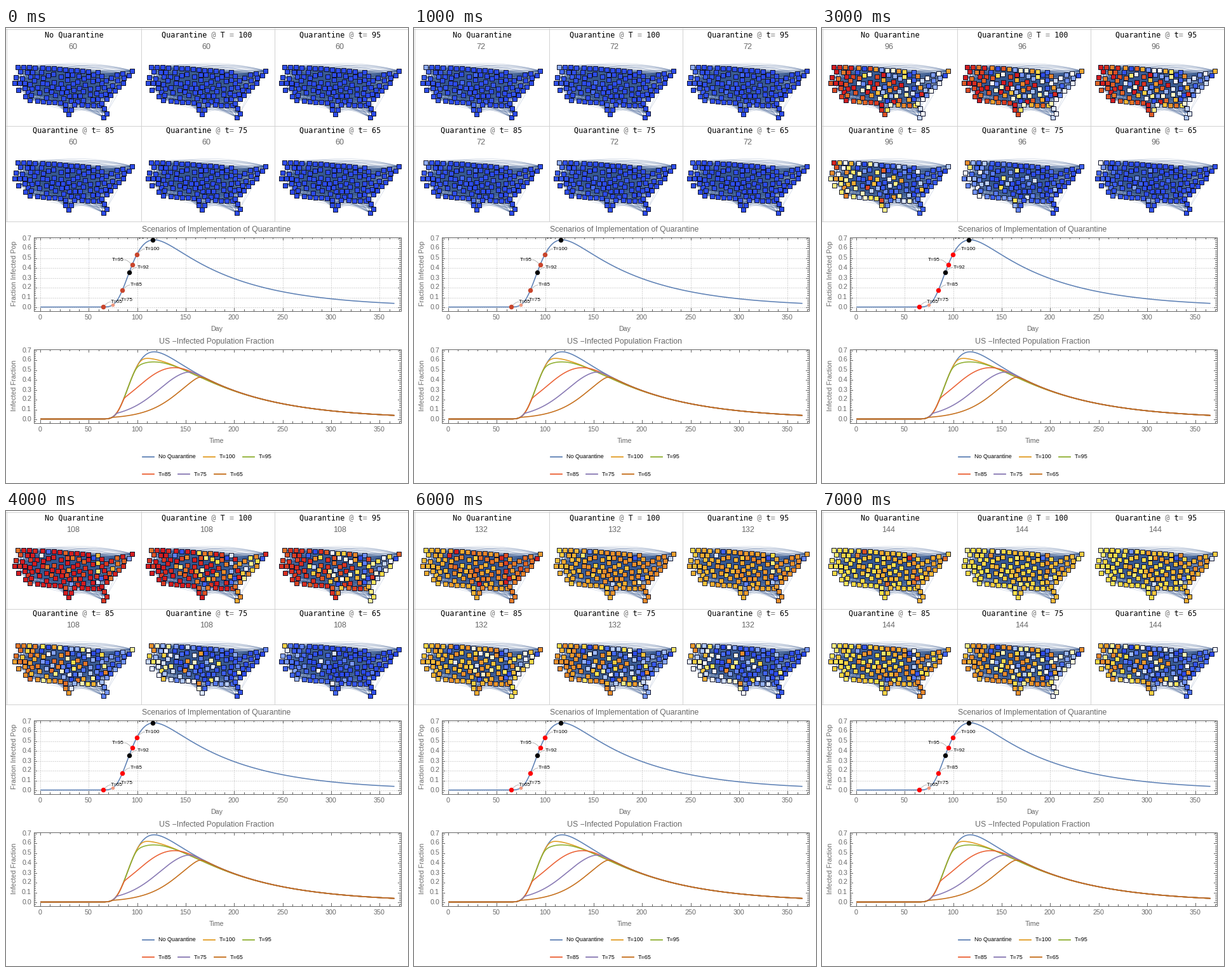
Recreate the animation shown at these times as a matplotlib script. Size 633 by 715 pixels, loop 8 s.

```python
import numpy as np
import matplotlib.pyplot as plt
from matplotlib.animation import FuncAnimation
from matplotlib.collections import LineCollection
from matplotlib.colors import LinearSegmentedColormap
from matplotlib.path import Path
from matplotlib.patches import Rectangle

W, H = 633, 715
PX = 0.72  # points per pixel at 100 dpi
GREY = "#686868"

fig = plt.figure(figsize=(W / 100, H / 100), dpi=100, facecolor="white")
ax = fig.add_axes([0, 0, 1, 1])
ax.set(xlim=(0, W), ylim=(H, 0))
ax.axis("off")


def line(x, y, color, width=1.0, **kw):
    ax.plot(x, y, color=color, lw=width * PX, **kw)


def text(x, y, s, size, color=GREY, font="Liberation Sans", ha="center", va="center", **kw):
    return ax.text(x, y, s, fontsize=size * PX, color=color, family=font, ha=ha, va=va, **kw)


# ---------- network ----------
OUTLINE = np.array([(18, 61), (57, 62), (144, 69), (157, 82), (174, 73), (198, 67), (184, 86),
                    (150, 118), (158, 134), (153, 140), (146, 121), (107, 120), (98, 135),
                    (85, 117), (37, 113), (19, 97), (13, 86)], float)


def make_nodes(rng, gap=7.5):
    """Nodes along the outline, then random ones inside, kept apart by a gap."""
    ring = np.vstack([OUTLINE, OUTLINE[:1]])
    border = [a + (b - a) * s for a, b in zip(ring, ring[1:])
              for s in np.arange(0, 1, 9 / np.hypot(*(b - a)))]
    inside = rng.uniform((13, 61), (198, 140), (9000, 2))
    inside = inside[Path(OUTLINE).contains_points(inside)]
    pts = OUTLINE.copy()
    for p in np.vstack([border, inside]):
        if np.hypot(*(pts - p).T).min() > gap:
            pts = np.vstack([pts, p])
    return np.round(rng.permutation(pts))


def make_edges(rng, pts, count=2200):
    s = np.linspace(0, 1, 9)[:, None]
    curves = []
    for a, b in rng.integers(0, len(pts), (count, 2)):
        p, q = pts[a], pts[b]
        mid = (p + q) / 2 - (0, 0.13 * abs(p[0] - q[0]) * rng.uniform(-0.3, 1))
        curves.append((1 - s) ** 2 * p + 2 * s * (1 - s) * mid + s ** 2 * q)
    return curves


rng = np.random.default_rng(14)
nodes = make_nodes(rng)
edges = make_edges(rng, nodes)

# day each node is half infected: west first, a few stragglers inland
x, y = nodes.T
west = x < 55
onset = 84 + 0.085 * (x - 13) + rng.normal(0, np.where(west, 2.5, 6))
onset += 19 * ((rng.random(len(x)) < 0.09) & ~west)
onset[(x < 20) & (y < 70)] = 75

HEAT = LinearSegmentedColormap.from_list("heat", [
    (0, "#2c4bea"), (0.17, "#4a70f4"), (0.35, "#a3bff8"), (0.5, "#ffffff"),
    (0.6, "#fffbb0"), (0.7, "#f8e24c"), (0.8, "#efab30"), (0.9, "#e06c26"), (0.97, "#d41c1f"),
    (1, "#d41c1f")])
SLOW = 0.32


def level(day, start):
    """Infected share per node; spread slows once quarantine starts."""
    spread = min(day, start) + SLOW * max(0, day - start)
    arrival = np.minimum(onset, start) + np.maximum(0, onset - start) / SLOW
    rise = 1 / (1 + np.exp((onset - spread) / 3.8))
    return rise * np.exp(-0.009 * np.maximum(0, day - arrival - 20))


for x in (0.5, 212.5, 422.5, 632.5):
    line([x, x], [1, 303], "#d2d2d2")
for y in (1.5, 153.5, 303.5):
    line([0, W], [y, y], "#d2d2d2")

PANELS = [(999, 61, "No Quarantine"), (100, 245, "Quarantine @ T = 100"),
          (95, 462, "Quarantine @ t= 95"), (85, 42, "Quarantine @ t= 85"),
          (75, 252, "Quarantine @ t= 75"), (65, 462, "Quarantine @ t= 65")]
panels = []
for i, (start, left, label) in enumerate(PANELS):
    shift = dx, dy = np.array([210 * (i % 3), 150 * (i // 3)])
    signs = "".join(c if c in "@=" else " " for c in label)
    words = "".join(" " if c in "@=" else c for c in label)
    for s, color in ((words, "black"), (signs, "#777777")):
        text(left, 15 + dy, s, 11.75, color, "DejaVu Sans Mono", "left", "baseline")
    ax.add_collection(LineCollection([c + shift for c in edges], colors="#34568f",
                                     linewidths=0.55, alpha=0.22, zorder=1))
    dots = ax.scatter(*(nodes + shift + 0.5).T, s=(7 * PX) ** 2, marker="s",
                      edgecolors="#10142c", linewidths=0.72, zorder=3)
    panels.append((start, dots, text(105 + dx, 30 + dy, "", 12.5)))


# ---------- charts ----------
ZERO, UNIT = 110, 154.3  # offset of value 0 below the frame top, pixels per unit


def px(day):
    return 53.5 + 1.527 * day


def free(day):
    """Unchecked epidemic: Gompertz rise with exponential recovery."""
    return 3.47 * np.exp(-0.0124 * day - np.exp((93.8 - day) / 13.2))


def slowed(day, size, rate, mid, width):
    """Follows the free curve until the slower logistic spread takes over."""
    held = size * np.exp(-rate * day) / (1 + np.exp((mid - day) / width))
    return (free(day) ** -20.0 + held ** -20.0) ** -0.05


def frame(top, title, xlabel, ylabel, grid):
    left, right, bottom = 43.5, 621.5, top + 116
    ax.add_patch(Rectangle((left, top), right - left, 116, fill=False, ec=GREY, lw=PX))
    text(331.5, top - 11.5, title, 12.3)
    text(332, bottom + 29, xlabel, 10.6)
    text(13, (top + bottom) / 2 - 1, ylabel, 10.6, rotation=90)
    dotted = dict(color="#b0b0b0", ls=(0, (1, 2)), zorder=0.5)
    for day in range(0, 371, 10):
        major = day % 50 == 0
        x, size = np.floor(px(day)) + 0.5, 4.5 if major else 2.5
        line([x, x], [bottom, bottom - size], GREY)
        line([x, x], [top, top + size], GREY)
        if major:
            text(x, bottom + 10, str(day), 10.8)
            if grid:
                line([x, x], [top, bottom], **dotted)
    for n in range(-1, 36):
        major = n % 5 == 0
        y, size = np.floor(top + ZERO - n * 0.02 * UNIT) + 0.5, 4.5 if major else 2.5
        line([left, left + size], [y, y], GREY)
        line([right, right - size], [y, y], GREY)
        if major:
            text(40, y, f"{n / 50:.1f}", 10.8, ha="right")
            if grid:
                line([left, right], [y, y], **dotted)


TOP1, TOP2 = 328.5, 504.5
frame(TOP1, "Scenarios of Implementation of Quarantine", "Day", "Fraction Infected Pop", True)
frame(TOP2, "US \u2212Infected Population Fraction", "Time", "Infected Fraction", False)

days = np.linspace(40, 365, 500)
SCENARIOS = [("No Quarantine", "#5e81b5", None),
             ("T=100", "#e19c24", (3.06, 0.0114, 82, 30)),
             ("T=95", "#8fb032", (2.6, 0.0106, 91, 21)),
             ("T=85", "#eb6235", (2.885, 0.0106, 114, 18.5)),
             ("T=75", "#8778b3", (3.19, 0.0103, 135, 17.8)),
             ("T=65", "#c56e1a", (4.24, 0.0105, 159, 17.8))]


def plot(top, share, color):
    line(np.r_[px(1), px(days)], top + ZERO - UNIT * np.r_[0, share], color, 1.6)


plot(TOP1, free(days), SCENARIOS[0][1])
for i, (label, color, args) in enumerate(SCENARIOS):
    plot(TOP2, slowed(days, *args) if args else free(days), color)
    x = ((215, 311, 373), (215, 271, 328))[i // 3][i % 3]
    y = 674 + 27 * (i // 3)
    line([x, x + 18], [y, y], color, 1.8)
    text(x + 25, y, label, 9, "black", ha="left")


def dot_at(day, color=None, size=7.5):
    day = np.array(day)
    return ax.scatter(px(day), TOP1 + ZERO - UNIT * free(day), s=(size * PX) ** 2,
                      c=color, linewidths=0, zorder=4)


for day in (65, 75, 85, 92, 95, 100):
    x, y = px(day), TOP1 + ZERO - UNIT * free(day)
    side = -1 if day == 95 else 1
    s = np.linspace(0, 1, 12)
    line(x + 12 * side * s, y - 8 * np.sin(s * np.pi / 2), "#aaaaaa", 0.8)
    text(x + 12.5 * side, y - 8, f"T={day}", 8.2, "black", ha="left" if side > 0 else "right")
line([209, 216], [329.5, 329.5], "#333333", ls=(0, (2, 3)))
dot_at([75], "#f09a80", 5.5)
dot_at([92, 116], "black")
marks = dot_at([65, 85, 95, 100], "red")


def update(i):
    day = 60 + 12 * i
    for start, dots, label in panels:
        dots.set_facecolor(HEAT(level(day, start)))
        label.set_text(str(day))
    marks.set_facecolor("#c8452c" if day < 96 else "#ff0000")
    return []


anim = FuncAnimation(fig, update, frames=8, interval=1000, repeat=True, repeat_delay=0)
plt.show()
```
